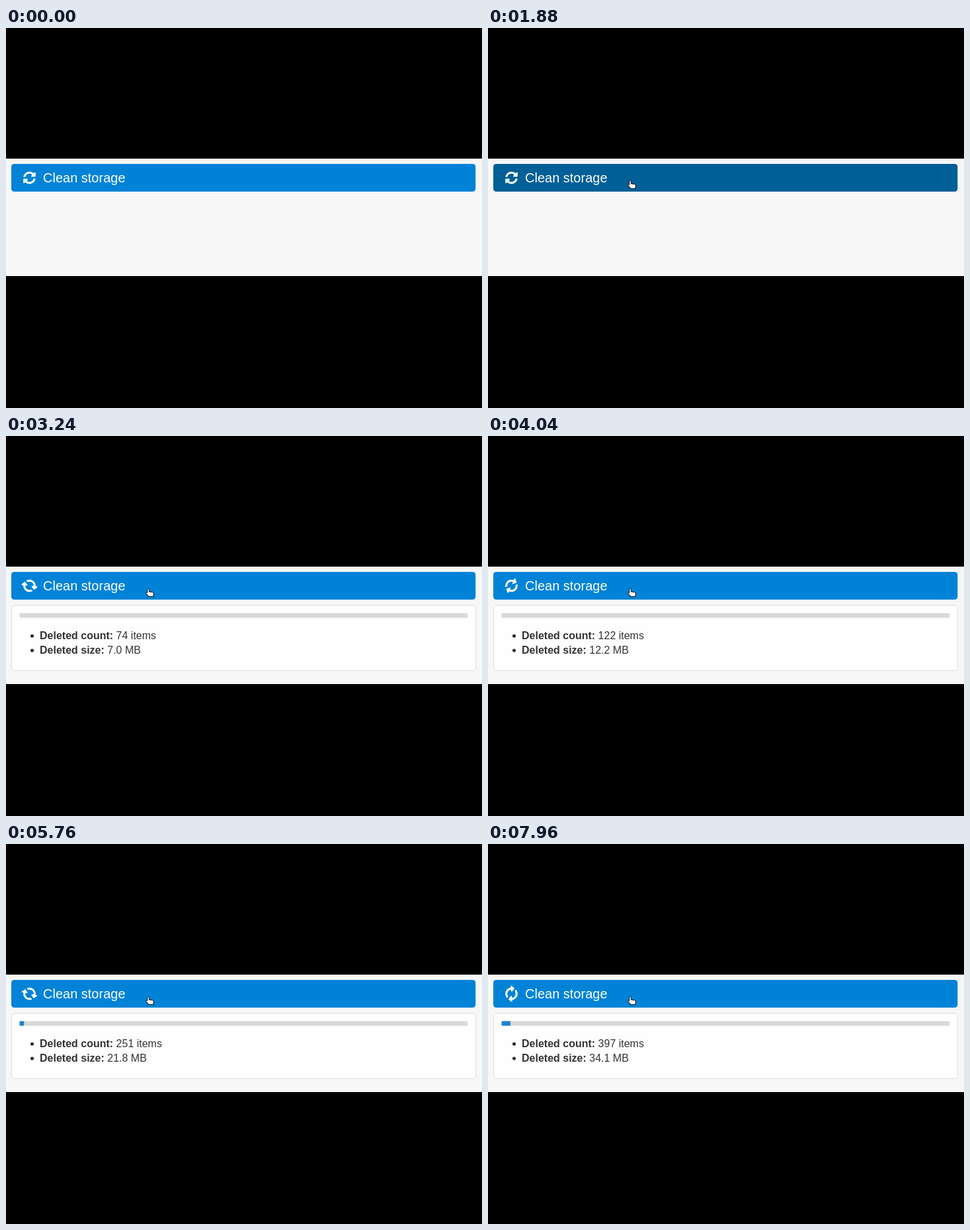
An HTML page for the animation above (8 s loop, 720 by 576 pixels).

```html
<!DOCTYPE html>
<html lang="en">
<head>
<meta charset="utf-8">
<title>Clean storage</title>
<style>
  html, body { margin: 0; width: 100%; height: 100%; overflow: hidden; background: #000; }
  svg { display: block; width: 720px; height: 576px; font: 16px "Liberation Sans", Arial, sans-serif; }
  .label { font-size: 20px; fill: #fff; }
  #panel text, #panel circle { fill: #333; }
  .name { font-weight: bold; }
  #cursor path { fill: #fff; stroke: #000; stroke-linejoin: round; }
</style>
</head>
<body>
<svg viewBox="0 0 720 576">
  <defs>
    <clipPath id="page"><rect y="198" width="720" height="178"/></clipPath>
    <path id="half" d="M370.7 133.3C339.5 104 298.9 88 255.8 88c-77.4 0-144.3 53.2-162.7 126.9-1.4 5.3-6.2 9.1-11.7 9.1H24.1c-7.5 0-13.2-6.8-11.8-14.2C33.9 94.9 134.8 8 256 8c66.4 0 126.8 26.1 171.3 68.7L463 41C478.1 25.9 504 36.6 504 57.9V192c0 13.3-10.7 24-24 24H345.9c-21.3 0-32-25.9-16.9-41z"/>
  </defs>
  <g clip-path="url(#page)">
    <rect y="198" width="720" height="178" fill="#f7f7f7"/>
    <rect id="button" x="8" y="206" width="702.3" height="42" rx="4.5"/>
    <g id="icon" fill="#fff">
      <use href="#half"/>
      <use href="#half" transform="rotate(180 256 256)"/>
    </g>
    <text class="label" x="56" y="234">Clean storage</text>
    <g id="panel">
      <rect x="8.5" y="256.5" width="702" height="99" rx="3.5" fill="#fefefe" stroke="#dfdfdf"/>
      <rect x="20.5" y="268.5" width="677.5" height="7" rx="1" fill="#d9d9d9"/>
      <rect id="bar" x="20.5" y="268.5" height="7" rx="1" fill="#2185d0"/>
      <circle cx="39.5" cy="303" r="2.6"/>
      <circle cx="39.5" cy="325" r="2.6"/>
      <text x="51" y="308"><tspan class="name">Deleted count:</tspan> <tspan id="count"></tspan></text>
      <text x="51" y="330"><tspan class="name">Deleted size:</tspan> <tspan id="size"></tspan></text>
    </g>
    <g id="cursor">
      <path id="arrow" d="M0 0V14l3.3-3 2.2 5 2.2-1-2.2-4.8H10z"/>
      <path id="hand" d="M-1.2 1.3C-1.2 0 1.4 0 1.4 1.3V5L7 5.8Q8.8 6.2 8.6 8L8 10.3V12.3H.2V11L-3.3 7.7Q-4 6-2.3 6L-1.2 7z"/>
    </g>
  </g>
</svg>
<script>
const LOOP = 8000, STEP = 40, MOVE = 1000, ARRIVE = 1800, CLICK = 2080, SPIN_FROM = 2100;
const FADE = 150, PERCENT = 6.775;
const BLUE = [0, 131, 214], HOVER_BLUE = [0, 95, 151];
// time, deleted items, deleted megabytes
const PROGRESS = [[CLICK, 0, 0], [2400, 24, 1.5], [4040, 122, 12.2],
                  [5000, 202, 17.7], [6600, 305, 26.3], [7960, 397, 34.1]];

const $ = id => document.getElementById(id);
const ramp = (t, start, length) => Math.min(1, Math.max(0, (t - start) / length));
const easeOut = p => 1 - (1 - p) ** 3;
const mix = (a, b, p) => a + (b - a) * p;
const show = (id, on) => $(id).setAttribute('display', on ? 'inline' : 'none');

function progressAt(t, column) {
  let i = 1;
  while (i < PROGRESS.length - 1 && t > PROGRESS[i][0]) i++;
  const a = PROGRESS[i - 1], b = PROGRESS[i];
  return mix(a[column], b[column], ramp(t, a[0], b[0] - a[0]));
}

function cursorAt(t) {
  const p = easeOut(ramp(t, MOVE, ARRIVE - MOVE));
  return [mix(262, 215, p), mix(188, 231, p)];
}

// first moment the pointer is over the button
let hoverStart = MOVE;
while (cursorAt(hoverStart)[1] < 206) hoverStart += STEP;

function draw(now) {
  const t = Math.floor((now % LOOP) / STEP) * STEP;

  const hover = ramp(t, hoverStart, FADE) - ramp(t, CLICK, FADE);
  $('button').setAttribute('fill', `rgb(${BLUE.map((c, i) => Math.round(mix(c, HOVER_BLUE[i], hover)))})`);

  const angle = Math.max(0, t - SPIN_FROM) * 0.36;
  $('icon').setAttribute('transform',
    `translate(35.5 227) rotate(${angle}) scale(.0375) translate(-256 -256)`);

  const [x, y] = cursorAt(t);
  $('cursor').setAttribute('transform', `translate(${x} ${y})`);
  show('cursor', t >= MOVE);
  show('arrow', t < hoverStart);
  show('hand', t >= hoverStart);

  show('panel', t >= CLICK);
  const percent = easeOut(ramp(t, 4400, 600)) + easeOut(ramp(t, 6240, 600));
  $('bar').setAttribute('width', percent * PERCENT);
  $('count').textContent = `${Math.round(progressAt(t, 1))} items`;
  $('size').textContent = `${progressAt(t, 2).toFixed(1)} MB`;
}

const origin = performance.now();
function tick() {
  draw(performance.now() - origin);
  requestAnimationFrame(tick);
}
tick();
</script>
</body>
</html>
```
